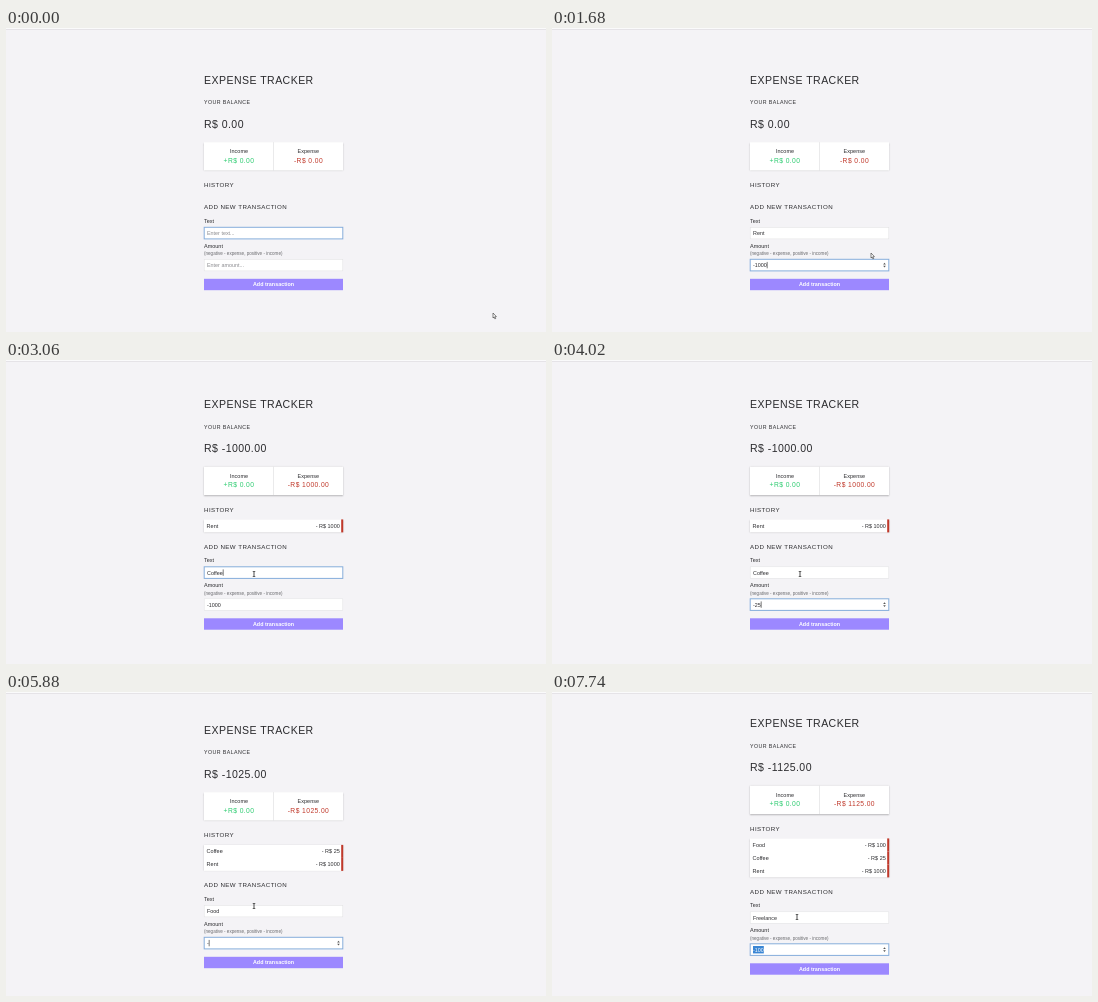
Recreate the animation shown at these times as an HTML page with a canvas. Size 540 by 304 pixels, loop 8 s.

```html
<!DOCTYPE html>
<html lang="en">
<head>
<meta charset="utf-8">
<title>Expense Tracker</title>
<style>
  html, body { margin: 0; height: 100%; overflow: hidden; background: #f4f3f6; }
  canvas { display: block; }
</style>
</head>
<body>
<canvas id="stage" width="540" height="304"></canvas>
<script>
const ctx = document.getElementById('stage').getContext('2d');
const LOOP = 8000, BLINK = 530;
const LEFT = 198, WIDTH = 139, RIGHT = LEFT + WIDTH, MIDDLE = LEFT + WIDTH / 2;
const INK = '#2b2b2e', RED = '#c0392b', GREEN = '#2ecc71', PURPLE = '#9c88ff';

// The session: a list of timed changes to the form
const events = [];
const at = (time, change) => events.push([time, change]);
const focus = (time, field, selected) => at(time, s => { s.focus = field; s.selected = selected; s.home = false; });
const submit = time => at(time, s => s.rows.unshift([s.text, s.amount]));
const type = (text, ...times) => [...text].forEach((char, i) => at(times[i], s => {
  s[s.focus] = (s.selected ? '' : s[s.focus]) + char;
  s.selected = false;
}));

type('Rent', 480, 600, 660, 780);
focus(1020, 'amount', false);
type('-1000', 1260, 1440, 1560, 1620, 1680);
submit(1800);
at(2280, s => { s.focus = 'text'; s.home = true; });
focus(2400, 'text', true);
type('Coffee', 2700, 2760, 2820, 2940, 3000, 3060);
focus(3300, 'amount', true);
type('-25', 3660, 3960, 4020);
submit(4140);
focus(4380, 'text', true);
type('Food', 4680, 4800, 4920, 5100);
focus(5400, 'amount', true);
type('-100', 5880, 6180, 6240, 6300);
submit(6360);
focus(6720, 'text', true);
type('Freelance', ...Array.from({ length: 9 }, (_, i) => 6900 + 60 * i));
focus(7620, 'amount', true);

const mousePath = [
  [0, 487, 285], [30, 487, 285], [180, 319, 225], [1920, 319, 225], [2220, 245, 212],
  [2400, 245, 212], [2520, 248, 214], [6600, 248, 214], [6720, 245, 225], [LOOP, 245, 225]
];

function mouseAt(time) {
  const i = mousePath.findIndex(p => p[0] > time);
  const [t0, x0, y0] = mousePath[i - 1], [t1, x1, y1] = mousePath[i];
  const k = (time - t0) / (t1 - t0);
  return [x0 + (x1 - x0) * k, y0 + (y1 - y0) * k];
}

function stateAt(time) {
  const state = { text: '', amount: '', focus: 'text', selected: false, home: false, rows: [], changed: -940 };
  for (const [when, change] of events) {
    if (when > time) break;
    change(state);
    state.changed = when;
  }
  return state;
}

function rect(x, y, w, h, color) {
  ctx.fillStyle = color;
  ctx.fillRect(x, y, w, h);
}

function panel(x, y, w, h) {
  ctx.save();
  ctx.shadowColor = 'rgba(0,0,0,.26)';
  ctx.shadowBlur = 1.6;
  ctx.shadowOffsetY = .5;
  rect(x, y, w, h, '#fff');
  ctx.restore();
}

// y is the middle of the capitals; type is set large and scaled for exact spacing
function write(text, x, y, size, { color = INK, align = 'left', spacing = 0, weight = 400 } = {}) {
  ctx.save();
  ctx.translate(x, y + size * .358);
  ctx.scale(.1, .1);
  ctx.font = `${weight} ${size * 10}px "Liberation Sans", Arial, sans-serif`;
  ctx.letterSpacing = spacing * 10 + 'px';
  ctx.textAlign = align;
  ctx.fillStyle = color;
  ctx.fillText(text, 0, 0);
  const width = ctx.measureText(text).width / 10;
  ctx.restore();
  return width;
}

function triangle(x, y, dy) {
  ctx.beginPath();
  ctx.moveTo(x - 1.3, y);
  ctx.lineTo(x + 1.3, y);
  ctx.lineTo(x, y + dy);
  ctx.fillStyle = '#555';
  ctx.fill();
}

function input(state, field, y, placeholder, time) {
  const value = state[field], focused = state.focus === field;
  const top = y - 6, x = LEFT + 3;
  rect(LEFT, top, WIDTH, 12, '#fff');
  ctx.lineWidth = focused ? 1 : .5;
  ctx.strokeStyle = focused ? '#86addb' : '#dedee0';
  ctx.strokeRect(LEFT + .2, top + .2, WIDTH - .4, 11.6);
  const width = write(value || placeholder, x, y, 5.4, { color: value ? INK : '#8a8a8e' });
  if (!focused) return;
  if (state.selected) {
    rect(x, y - 3.6, width, 7.4, '#3a86d4');
    write(value, x, y, 5.4, { color: '#fff' });
  } else if (Math.floor((time - state.changed) / BLINK) % 2 === 0) {
    rect(x + (value && !state.home ? width : 0), y - 3.2, .6, 6.4, '#222');
  }
  if (field === 'amount') {
    triangle(RIGHT - 4.5, y - .6, -1.8);
    triangle(RIGHT - 4.5, y + .7, 1.8);
  }
}

function pointer(x, y, overInput) {
  ctx.save();
  ctx.translate(x, y);
  ctx.beginPath();
  if (overInput) {
    rect(-.4, -2.8, .8, 5.6, '#222');
    rect(-1.3, -3, 2.6, .6, '#222');
    rect(-1.3, 2.4, 2.6, .6, '#222');
  } else {
    [[0, 0], [0, 5], [1.1, 4], [1.9, 5.9], [2.7, 5.5], [1.9, 3.7], [3.4, 3.6]].forEach(p => ctx.lineTo(...p));
    ctx.closePath();
    ctx.fillStyle = '#fff';
    ctx.fill();
    ctx.lineWidth = .6;
    ctx.strokeStyle = '#333';
    ctx.stroke();
  }
  ctx.restore();
}

function draw(time) {
  const state = stateAt(time), { rows } = state;
  const shift = rows.length ? 1 + 6.5 * rows.length : 0;
  const up = y => y - shift, down = y => y + shift;
  const spent = -rows.reduce((sum, row) => sum + Number(row[1]), 0);
  const spaced = { spacing: .4 };
  const money = color => ({ color, align: 'center', spacing: .4 });
  const centered = { align: 'center' };

  rect(0, 0, 540, 304, '#f4f3f6');
  rect(0, 0, 540, 1, '#fafafb');
  rect(0, 1, 540, 1, '#e5e3e7');

  write('EXPENSE TRACKER', LEFT, up(52), 10.6, spaced);
  write('YOUR BALANCE', LEFT, up(74.2), 5.3, spaced);
  write(`R$ ${spent ? '-' : ''}${spent.toFixed(2)}`, LEFT, up(96.2), 10.6, spaced);

  panel(LEFT, up(114.2), WIDTH, 28.3);
  rect(MIDDLE - .25, up(114.2), .5, 28.3, '#d4d4d6');
  write('Income', 233, up(123.4), 5.5, centered);
  write('+R$ 0.00', 233, up(132.4), 6.75, money(GREEN));
  write('Expense', 302.3, up(123.4), 5.5, centered);
  write(`-R$ ${spent.toFixed(2)}`, 302.5, up(132.4), 6.75, money(RED));

  write('HISTORY', LEFT, up(157), 6.2, spaced);
  if (rows.length) panel(LEFT, up(166.9), WIDTH, rows.length * 13);
  rows.forEach(([text, amount], i) => {
    const y = up(173.3) + i * 13;
    rect(RIGHT - 1.8, y - 6.4, 2, 13, RED);
    write(text, LEFT + 2.6, y, 5.5);
    write(`- R$ ${-amount}`, RIGHT - 3.2, y, 5.5, { align: 'right' });
  });

  write('ADD NEW TRANSACTION', LEFT, down(179), 6.2, spaced);
  write('Text', LEFT, down(192.8), 5.5);
  input(state, 'text', down(205.1), 'Enter text...', time);
  write('Amount', LEFT, down(218), 5.5);
  write('(negative - expense, positive - income)', LEFT, down(225.4), 4.57, { color: '#6c6c70' });
  input(state, 'amount', down(237.1), 'Enter amount...', time);
  rect(LEFT, down(250.8), WIDTH, 11.4, PURPLE);
  write('Add transaction', MIDDLE, down(256.4), 5.4, { color: '#fff', align: 'center', weight: 700 });

  const [x, y] = mouseAt(time);
  const overInput = x > LEFT && x < RIGHT && [205.1, 237.1].some(c => Math.abs(y - down(c)) < 6.2);
  pointer(x, y, overInput);
}

function tick() {
  draw(performance.now() % LOOP);
  requestAnimationFrame(tick);
}
tick();
</script>
</body>
</html>
```
